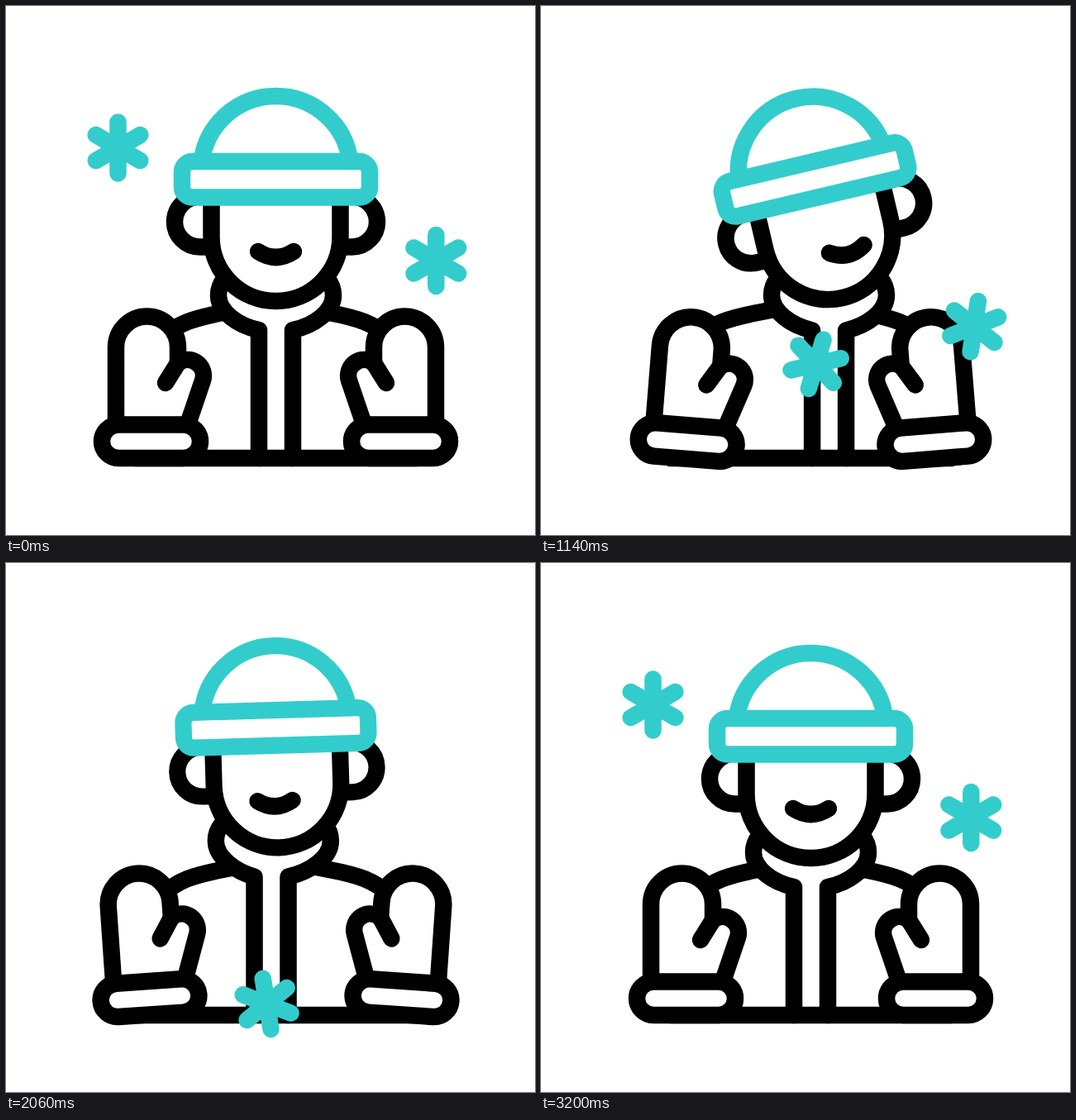
These frames come from a looping animation (640 by 640 pixels, 3.22 s). An HTML page:

```html
<!DOCTYPE html>
<html lang="en">
<head>
<meta charset="utf-8">
<title>Winter greeting</title>
<style>
  html, body { margin: 0; width: 100%; height: 100%; overflow: hidden; background: #fff; }
  svg { display: block; width: 100vw; height: 100vh; }
</style>
</head>
<body>
<svg viewBox="0 0 640 640" fill="none" stroke="#000" stroke-width="20.5" stroke-linecap="round" stroke-linejoin="round">
  <defs>
    <path id="shoulder" d="M188 403C206 384 228 377.500 262 371L285 366.500"/>
    <g id="mitten" fill="#fff">
      <path d="M133 506V413A37.500 37.500 0 0 1 208 413V432A19.200 19.200 0 0 1 238 453L220 506"/>
      <path d="M193 456L208 432"/>
      <rect x="116" y="506.500" width="119" height="40.500" rx="20.250"/>
    </g>
    <path id="ear" d="M250 291.500H234.500A30.500 30.500 0 0 1 234.500 230.500H250" fill="#fff"/>
    <path id="flake" d="M0-31V31M-26.800-15.500L26.800 15.500M-26.800 15.500L26.800-15.500"/>
  </defs>
  <use href="#shoulder"/>
  <use href="#shoulder" transform="matrix(-1 0 0 1 653 0)"/>
  <path id="jacket" fill="#fff"/>
  <path d="M157 547H496"/>
  <g id="head">
    <use href="#ear"/>
    <use href="#ear" transform="matrix(-1 0 0 1 653 0)"/>
    <path d="M248.500 215V279A78 78 0 0 0 404.500 279V215" fill="#fff"/>
    <path id="mouth" d="M305 297Q326.500 311 348 297"/>
    <g stroke="#3cc" fill="#fff">
      <path d="M236.500 190A90.500 90.500 0 0 1 416.500 190"/>
      <rect x="213" y="188" width="227" height="43.500" rx="12.500"/>
    </g>
  </g>
  <use id="leftHand" href="#mitten"/>
  <g transform="matrix(-1 0 0 1 653 0)"><use id="rightHand" href="#mitten"/></g>
  <g stroke="#3cc">
    <use id="flakeA" href="#flake"/>
    <use id="flakeB" href="#flake"/>
  </g>
</svg>
<script>
  const LOOP = 3220, STEP = 600, RESPAWN = 2500;
  const $ = id => document.getElementById(id);
  const clamp = v => Math.max(0, Math.min(1, v));
  const ease = v => { const u = clamp(v); return u * u * (3 - 2 * u); };
  const mix = (a, b, k) => a + (b - a) * k;
  const set = (id, name, value) => $(id).setAttribute(name, value);

  const rest = { hand: 0, zipX: 0, zipY: 0, neckX: 0, neckY: 0, headX: 0, headY: 0, tilt: 0, mouthX: 0, mouthY: 0 };
  const left = { hand: -10, zipX: -25, zipY: -21.6, neckX: -21, neckY: -23.5, headX: -11.5, headY: -18.3, tilt: 6.5, mouthX: -18.8, mouthY: 1.2 };
  const right = { hand: 5, zipX: 23.4, zipY: 1, neckX: 23.2, neckY: 0.5, headX: 21.8, headY: -1.3, tilt: -13.8, mouthX: 19, mouthY: 3.5 };
  const poses = [rest, left, right, left, right, rest];

  // The head morphs in straight lines, so its tilt is blended as cosine and sine.
  for (const pose of [rest, left, right]) {
    const angle = pose.tilt * Math.PI / 180;
    pose.cos = Math.cos(angle);
    pose.sin = Math.sin(angle);
  }

  function poseAt(t) {
    const i = Math.min(4, Math.floor(t / STEP));
    const k = ease(t / STEP - i);
    const pose = {};
    for (const key in rest) pose[key] = mix(poses[i][key], poses[i + 1][key], k);
    return pose;
  }

  function drawPerson(t) {
    const p = poseAt(t);
    const zip = x => `${x + p.zipX} ${392 + p.zipY}`;
    const neck = (x, y) => `${x + p.neckX} ${y + p.neckY}`;
    set('jacket', 'd', `M${306 + p.zipX} 547L${zip(306)}` +
      `C${neck(281, 387)} ${neck(257, 370)} ${neck(257, 350)}` +
      `C${neck(257, 342)} ${neck(260, 335)} ${neck(265, 329)}` +
      `L${neck(388, 329)}C${neck(393, 335)} ${neck(396, 342)} ${neck(396, 350)}` +
      `C${neck(396, 370)} ${neck(372, 387)} ${zip(347)}L${347 + p.zipX} 547`);
    set('head', 'transform', `translate(${326.5 + p.headX} ${279 + p.headY}) ` +
      `matrix(${p.cos} ${p.sin} ${-p.sin} ${p.cos} 0 0) translate(-326.5 -279)`);
    set('mouth', 'transform', `translate(${p.mouthX} ${p.mouthY})`);
    for (const id of ['leftHand', 'rightHand']) set(id, 'transform', `rotate(${p.hand} 166 548)`);
  }

  // Each flake drifts along two eased curves, swinging at the turn.
  const flakes = {
    flakeA: {
      times: [0, 1300, RESPAWN], spin: [0, 71.5, 42],
      x: [135.5, 110, 428, 539, 423, 236, 340],
      y: [171.5, 579, 517, 370, 420, 473.5, 690]
    },
    flakeB: {
      times: [0, 900, 1880], spin: [0, -51, 0],
      x: [520.3, 472, 424, 376, 242, 383.5, 400],
      y: [308, 340, 371, 403, 473, 512, 695]
    }
  };

  function bezier(points, from, u) {
    const [a, b, c, d] = points.slice(from, from + 4), v = 1 - u;
    return a * v ** 3 + 3 * b * v * v * u + 3 * c * v * u * u + d * u ** 3;
  }

  function drawFlake(id, t) {
    const f = flakes[id];
    let x = f.x[0], y = f.y[0], angle = 0, opacity = 1;
    if (t >= RESPAWN) {
      y -= 77 * (1 - ease((t - RESPAWN) / 700));
      opacity = clamp((t - RESPAWN) / 600);
    } else {
      const i = t < f.times[1] ? 0 : 1;
      const k = ease((t - f.times[i]) / (f.times[i + 1] - f.times[i]));
      x = bezier(f.x, i * 3, k);
      y = bezier(f.y, i * 3, k);
      angle = mix(f.spin[i], f.spin[i + 1], k);
    }
    set(id, 'transform', `translate(${x} ${y}) rotate(${angle})`);
    set(id, 'opacity', opacity);
  }

  const start = performance.now();
  function render(now) {
    const t = Math.max(0, now - start) % LOOP;
    drawPerson(t);
    Object.keys(flakes).forEach(id => drawFlake(id, t));
    requestAnimationFrame(render);
  }
  render(start);
</script>
</body>
</html>
```
